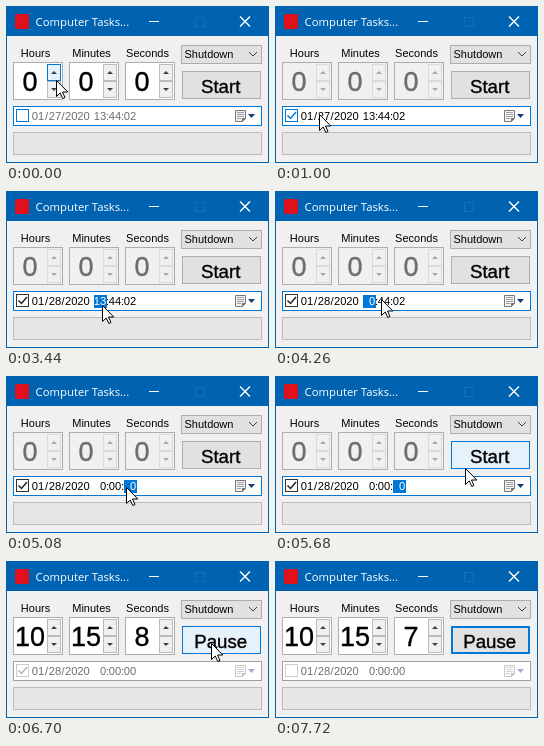
Animation, 263 px wide and 157 px high, one loop 8 s. Source, as an HTML page:

```html
<!DOCTYPE html>
<html lang="en">
<head>
<meta charset="utf-8">
<title>Computer Tasks</title>
<style>
html, body { margin: 0; width: 100%; height: 100%; overflow: hidden; background: #f0f0f0; }
svg { display: block; width: 100%; height: 100%; }
text { font-family: "Liberation Sans", Arial, sans-serif; white-space: pre; }
.title { font-family: "Open Sans", "Noto Sans", sans-serif; font-weight: 500; }
.big { stroke: currentColor; stroke-width: .35; }
</style>
</head>
<body>
<svg id="stage" viewBox="0 0 263 157"></svg>
<script>
const LOOP = 8000;
const BLUE = '#0078d7', EDGE = '#abadb3', PALE = '#cccccc', FACE = '#f0f0f0', MUTED = '#6d6d6d';
const svg = document.getElementById('stage');

function add(tag, attrs, text) {
  const el = document.createElementNS('http://www.w3.org/2000/svg', tag);
  set(el, attrs);
  if (text !== undefined) el.textContent = text;
  return svg.appendChild(el);
}
function set(el, attrs) {
  for (const key in attrs) el.setAttribute(key, attrs[key]);
}
const fill = (x, y, width, height, color) =>
  add('rect', { x, y, width, height, fill: color, 'shape-rendering': 'crispEdges' });
// One pixel border drawn inside the given box
const box = (x, y, w, h, color, stroke) =>
  add('rect', { x: x + .5, y: y + .5, width: w - 1, height: h - 1, fill: color, stroke });
const label = (x, y, size, text, anchor = 'start', color = '#000') =>
  add('text', { x, y, 'font-size': size, 'text-anchor': anchor, fill: color }, text);
const path = (d, color) => add('path', { d, fill: color });
const line = (d, stroke, width = 1) => add('path', { d, fill: 'none', stroke, 'stroke-width': width });

// Window frame and title bar
fill(0, 0, 263, 157, '#0063b1');
fill(1, 30, 261, 126, FACE);
add('rect', { x: 9, y: 8, width: 14, height: 15, rx: 2, fill: '#e0101c' });
set(label(29.6, 20, 11.3, 'Computer Tasks...', 'start', '#fff'), { class: 'title' });
fill(143, 15, 10, 1, '#fff');
box(189, 11, 10, 10, 'none', '#1470b8');
line('M234 10.5l10 10m0 -10l-10 10', '#fff', 1.4);

// Number boxes with spin buttons
function spinner(x, name) {
  label(x + 22.5, 51, 11, name, 'middle');
  const body = box(x, 56, 50, 38, '#fff', EDGE);
  const digits = label(x + 17, 84.5, 27, '0', 'middle');
  set(digits, { class: 'big' });
  const buttons = [58, 75].map(y => box(x + 34, y, 14, 17, FACE, PALE));
  const arrows = [
    path(`M${x + 38} 68l3 -3l3 3z`, '#404040'),
    path(`M${x + 38} 82l3 3l3 -3z`, '#404040')
  ];
  return (value, on, hot) => {
    const ink = on ? '#000' : MUTED;
    digits.textContent = value;
    set(digits, { fill: ink, color: ink });
    set(body, { fill: on ? '#fff' : FACE });
    buttons.forEach((b, i) => {
      const lit = hot && i === 0;
      set(b, { fill: lit ? '#e5f1fb' : FACE, stroke: lit ? BLUE : on ? '#bbb' : '#dadada' });
    });
    arrows.forEach(a => set(a, { fill: on ? '#404040' : '#a8a8a8' }));
  };
}
const spinners = [spinner(7, 'Hours'), spinner(63, 'Minutes'), spinner(119, 'Seconds')];

// Action list
box(175, 39, 81, 19, '#e1e1e1', '#adadad');
label(178.5, 52, 11, 'Shutdown');
line('M243 46l4 4l4 -4', '#404040');

// Main button
const looks = {
  idle: ['#e1e1e1', '#adadad'],
  hover: ['#e5f1fb', BLUE],
  pressed: ['#cce4f7', '#005499'],
  focus: ['#e1e1e1', BLUE]
};
const button = box(176, 65, 79, 28, '#e1e1e1', '#adadad');
const focusRing = box(177, 66, 77, 26, 'none', BLUE);
const caption = label(214.7, 87, 18.67, 'Start', 'middle');
set(caption, { class: 'big' });

// Date row
const dateBox = box(7, 100, 249, 20, '#fff', BLUE);
const check = box(10, 103, 13, 13, '#fff', BLUE);
const tick = line('M12.5 109.5l3 3l5.5 -6.5', '#333', 1.5);
const mark = fill(0, 104, 13, 13, BLUE);
const fieldX = { month: 26, day: 43, year: 59, hour: 88, min: 103, sec: 118 };
const fields = {};
for (const name in fieldX) {
  const right = fieldX[name] + (name === 'year' ? 24.8 : 12.2);
  fields[name] = label(right, 114, 11.2, '', 'end');
}
const marks = [[39, '/'], [55.5, '/'], [100, ':'], [115, ':']].map(([x, s]) => label(x, 114, 11.2, s));

// Calendar page with a folded corner
const calendar = [
  add('path', { d: 'M229.5 104.5h10v8l-3 3h-7z', fill: '#f4f4f4', stroke: '#777' }),
  line('M231 106.5h7M231 108.5h7M231 110.5h7M231 112.5h4', '#a0a0a0'),
  path('M236 116v-4h4z', '#777'),
  path('M242 108h7l-3.5 4z', '#173a7a')
];

// Progress bar
box(7, 126, 249, 23, '#e6e6e6', '#bcbcbc');

const cursor = add('path', {
  d: 'M-.5 1.5V17.5L3.2 14L5.8 19.5L8 18.5L5.5 13H10.8Z',
  fill: '#fff', stroke: '#000', 'stroke-width': 1
});

// Each step keeps the previous state and changes only what it names
const steps = [
  [0, { at: [51, 73], values: [0, 0, 0], spinOn: true, spinHot: true, checked: false, hot: true, pick: '',
        day: '27', hour: '13', min: '44', sec: '02', look: 'idle', caption: 'Start', locked: false }],
  [180, { at: [43, 86], spinHot: false }],
  [380, { at: [27, 101] }],
  [580, { at: [17, 109] }],
  [800, { at: [18, 109], checked: true, spinOn: false }],
  [1000, { at: [45, 107] }],
  [1220, { at: [52, 109] }],
  [1400, { at: [56, 112], hot: false }],
  [1600, { at: [58, 114] }],
  [1820, { pick: 'day' }],
  [2020, { day: '2' }],
  [2440, { day: '28' }],
  [2640, { at: [66, 114] }],
  [2840, { at: [84, 114] }],
  [3040, { at: [97, 113] }],
  [3440, { pick: 'hour' }],
  [3640, { hour: '0' }],
  [3860, { at: [99, 107] }],
  [4060, { at: [103, 100] }],
  [4260, { at: [107, 107] }],
  [4460, { at: [106, 110], pick: 'min' }],
  [4660, { min: '0' }],
  [4860, { at: [121, 110], min: '00', pick: 'sec' }],
  [5060, { sec: '0' }],
  [5280, { at: [144, 105] }],
  [5480, { at: [171, 97] }],
  [5680, { at: [191, 91], look: 'hover' }],
  [5880, { at: [201, 85] }],
  [6080, { at: [206, 81] }],
  [6280, { look: 'pressed', pick: '', sec: '00' }],
  [6480, { look: 'hover', caption: 'Pause', values: [10, 15, 9], spinOn: true, locked: true }],
  [6700, { values: [10, 15, 8] }],
  [7100, { at: null, look: 'focus' }],
  [7720, { values: [10, 15, 7], checked: false }]
];

function stateAt(t) {
  const state = { month: '01', year: '2020' };
  for (const [start, change] of steps) {
    if (start > t) break;
    Object.assign(state, change);
  }
  return state;
}

function draw(t) {
  const s = stateAt(t);
  spinners.forEach((show, i) => show(s.values[i], s.spinOn, s.spinHot && i === 0));

  const [face, edge] = looks[s.look];
  set(button, { fill: face, stroke: edge });
  set(focusRing, { visibility: s.look === 'focus' ? 'visible' : 'hidden' });
  caption.textContent = s.caption;

  set(dateBox, { stroke: s.locked ? '#a0a0a0' : BLUE });
  set(check, { stroke: s.locked ? PALE : s.hot ? BLUE : '#333' });
  set(tick, { visibility: s.checked ? 'visible' : 'hidden', stroke: s.locked ? '#b0b0b0' : s.hot ? BLUE : '#222' });

  const ink = s.checked && !s.locked ? '#000' : MUTED;
  for (const name in fields) {
    fields[name].textContent = s[name];
    set(fields[name], { fill: s.pick === name ? '#fff' : ink });
  }
  marks.forEach(m => set(m, { fill: ink }));
  set(mark, { x: fieldX[s.pick] || 0, visibility: s.pick ? 'visible' : 'hidden' });
  calendar.forEach(c => set(c, { opacity: s.locked ? .4 : 1 }));

  set(cursor, s.at
    ? { visibility: 'visible', transform: `translate(${s.at})` }
    : { visibility: 'hidden' });
}

const began = performance.now();
function frame() {
  draw((performance.now() - began) % LOOP);
  requestAnimationFrame(frame);
}
frame();
</script>
</body>
</html>
```
